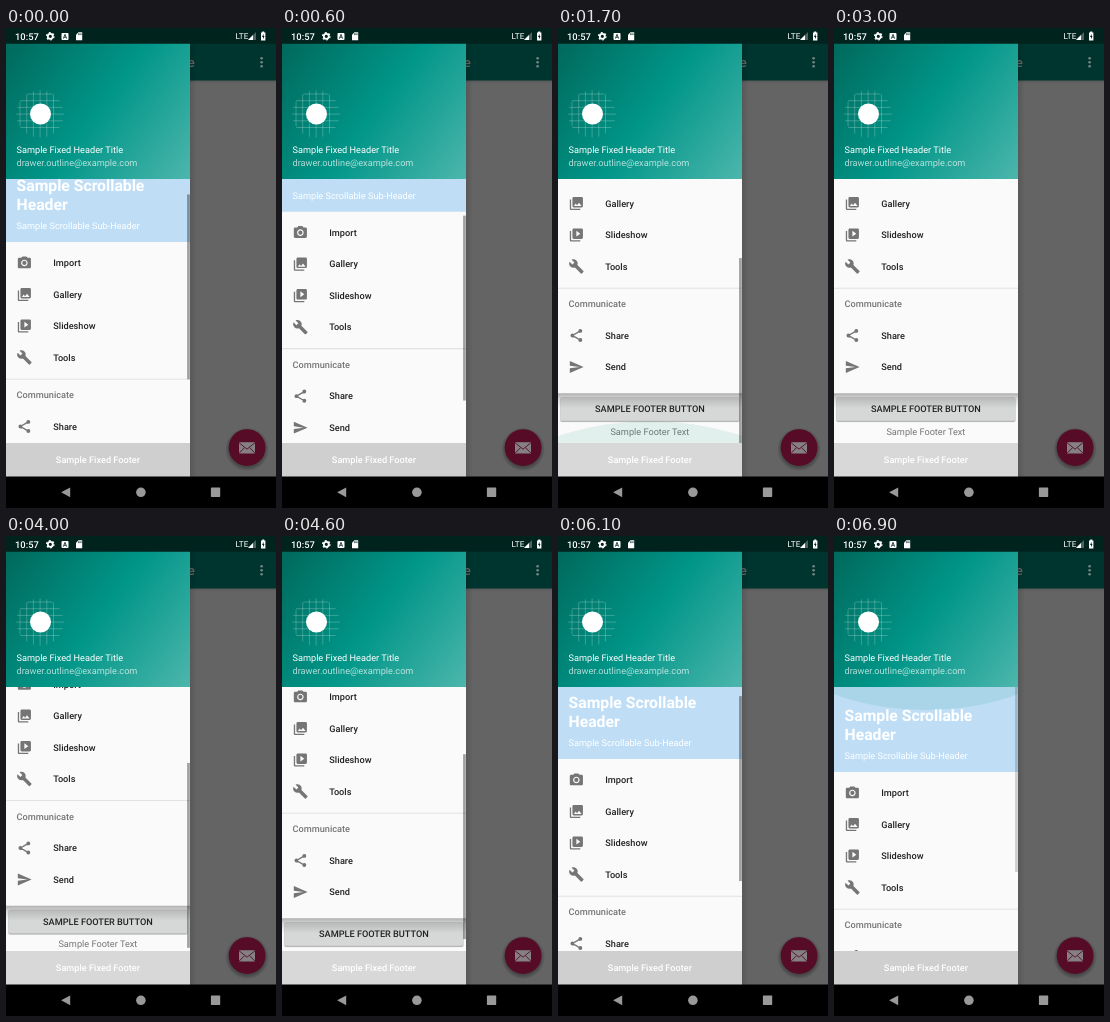
These frames come from a looping animation (270x480 px, 7.1 s). An HTML page:

```html
<!DOCTYPE html>
<html lang="en">
<head>
<meta charset="utf-8">
<title>Navigation drawer</title>
<style>
html, body { margin: 0; width: 100%; height: 100%; overflow: hidden; background: #000; }
svg { display: block; width: 270px; height: 480px; }
text { font: 9.19px Roboto, sans-serif; text-rendering: geometricPrecision; }
.mid { text-anchor: middle; }
.med { font-weight: 500; }
.big { font-size: 15.75px; font-weight: 700; }
.icon { fill: #757575; }
</style>
</head>
<body>
<svg viewBox="0 0 270 480">
  <defs>
    <linearGradient id="teal" gradientUnits="userSpaceOnUse" x1="184" y1="151" x2="0" y2="16">
      <stop stop-color="#4db6ac"/><stop offset=".5" stop-color="#009688"/><stop offset="1" stop-color="#00695c"/>
    </linearGradient>
    <linearGradient id="fade" x2="0" y2="1">
      <stop stop-opacity=".3"/><stop offset=".35" stop-opacity=".13"/><stop offset="1" stop-opacity="0"/>
    </linearGradient>
    <linearGradient id="side">
      <stop stop-opacity=".12"/><stop offset="1" stop-opacity="0"/>
    </linearGradient>
    <radialGradient id="halo">
      <stop offset=".8" stop-opacity=".3"/><stop offset="1" stop-opacity="0"/>
    </radialGradient>
    <clipPath id="view"><path d="M0 151H184V415H0z"/></clipPath>
    <clipPath id="round"><circle cx="34" cy="86" r="23.8"/></clipPath>
  </defs>

  <!-- dimmed page -->
  <path fill="#646464" d="M0 0H270V449H0z"/>
  <path fill="url(#fade)" opacity=".6" d="M0 52.5H270V55.5H0z"/>
  <path fill="#00352f" d="M0 15H270V52.5H0z"/>
  <text class="med" x="181.7" y="38.7" fill="#666" style="font-size:13.1px">e</text>
  <g fill="#7a8583"><circle cx="255.6" cy="30.2" r="1.3"/><circle cx="255.6" cy="34.2" r="1.3"/><circle cx="255.6" cy="38.2" r="1.3"/></g>
  <circle cx="241.1" cy="421.3" r="22" fill="url(#halo)"/>
  <circle cx="241.1" cy="419.6" r="18.4" fill="#560b26"/>
  <path fill="#858083" d="M233 414.2h16v11.3h-16z"/>
  <path fill="none" stroke="#560b26" stroke-width=".9" d="M233 414.7l8 6.5 8-6.5M233 425.2l5.6-5.6M249 425.2l-5.6-5.6"/>
  <path fill="url(#side)" d="M184 15H191V449H184z"/>

  <!-- drawer -->
  <path fill="#fafafa" d="M0 16H184V449H0z"/>
  <g clip-path="url(#view)">
    <g id="content">
      <path fill="#bfdef6" d="M0 151H184V236H0z"/>
      <g fill="#fff">
        <text class="big" x="10.5" y="185.3">Sample Scrollable</text>
        <text class="big" x="10.5" y="203.7">Header</text>
        <text x="10.5" y="222.9">Sample Scrollable Sub-Header</text>
      </g>
      <g id="menu"></g>
      <path fill="#dadada" d="M0 372.7H184v.9H0z"/>
      <text class="med" x="10.5" y="392.3" fill="#757575">Communicate</text>
      <rect x="1.9" y="482" width="180" height="25.2" rx="2" fill="#000" fill-opacity=".1"/>
      <rect x="2.6" y="483.1" width="178.6" height="23.8" rx="1.3" fill="#b5b6b6"/>
      <rect x="2.6" y="482.2" width="178.6" height="23.6" rx="1.3" fill="#d6d7d7"/>
      <path fill="url(#fade)" d="M0 478.3H184v15H0z"/>
      <text class="med mid" x="91.9" y="497" fill="#212121">SAMPLE FOOTER BUTTON</text>
      <text class="mid" x="91.9" y="519.6" fill="#757575">Sample Footer Text</text>
    </g>
    <ellipse id="topGlow" cx="92" cy="151" fill="#008577"/>
    <ellipse id="endGlow" cx="92" cy="415" fill="#008577"/>
    <rect id="bar" x="181.1" width="2.7" height="184.9"/>
  </g>

  <path fill="url(#teal)" d="M0 15H184V151H0z"/>
  <path id="grid" clip-path="url(#round)" fill="none" stroke="#fff" stroke-opacity=".45" stroke-width=".5"/>
  <circle cx="34.5" cy="86" r="10.5" fill="#fff"/>
  <text x="10.5" y="125" fill="#fff">Sample Fixed Header Title</text>
  <text x="10.5" y="137.6" fill="#fff" fill-opacity=".7">drawer.outline@example.com</text>

  <path fill="#d8d8d8" d="M0 415H184V449H0z"/>
  <path id="shade" fill="#cfcfcf" d="M0 415H184V449H0z"/>
  <text class="med mid" x="91.9" y="435" fill="#fff">Sample Fixed Footer</text>

  <!-- system bars -->
  <path fill="#00231e" d="M0 0H270V15.75H0z"/>
  <g fill="#fff">
    <text class="med" x="9" y="11.8" style="font-size:9.4px">10:57</text>
    <circle cx="44.3" cy="8.3" r="2.5" fill="none" stroke="#fff" stroke-width="1.8"/>
    <circle cx="44.3" cy="8.3" r="3.7" fill="none" stroke="#fff" stroke-width="1.2" stroke-dasharray="1.9 1.975"/>
    <rect x="55.5" y="5" width="7" height="7" rx="1"/>
    <path fill="none" stroke="#00231e" stroke-width=".8" d="M57.3 10.7L59 6.3l1.7 4.4M57.9 9.3h2.2"/>
    <path d="M72.5 4.3H76.2V12.3H70V6.8z"/>
    <path stroke="#00231e" stroke-width=".7" d="M72.6 5.3v1.8M73.9 5.3v1.8M75.1 5.3v1.8"/>
    <text x="229.5" y="11.4" style="font-size:8.2px">LTE</text>
    <path d="M250 4V12H242z" fill-opacity=".3"/>
    <path d="M247 7V12H242z"/>
    <path d="M255 4.6h1.2v-1h2v1h1.2v7.8H255z"/>
    <path fill="#00231e" d="M257.6 5.8L256 8.9h1v2.3l1.5-3.2h-.9z"/>
  </g>
  <path d="M0 448.5H270V480H0z"/>
  <g fill="#999">
    <path d="M55.1 464.3L64.2 459.4V469.2z"/><circle cx="134.9" cy="464.3" r="4.8"/>
    <rect x="204.9" y="459.6" width="9.3" height="9.3" rx=".6"/>
  </g>
</svg>
<script>
const $ = id => document.getElementById(id);

const rows = [
  ['Import', 257, 'M9 2L7.17 4H4c-1.1 0-2 .9-2 2v12c0 1.1.9 2 2 2h16c1.1 0 2-.9 2-2V6c0-1.1-.9-2-2-2h-3.17L15 2H9zm3 15c-2.76 0-5-2.24-5-5s2.24-5 5-5 5 2.24 5 5-2.24 5-5 5zM8.8 12a3.2 3.2 0 1 0 6.4 0a3.2 3.2 0 1 0-6.4 0z'],
  ['Gallery', 288.5, 'M22 16V4c0-1.1-.9-2-2-2H8c-1.1 0-2 .9-2 2v12c0 1.1.9 2 2 2h12c1.1 0 2-.9 2-2zm-11-4l2.03 2.71L16 11l4 5H8l3-4zM2 6v14c0 1.1.9 2 2 2h14v-2H4V6H2z'],
  ['Slideshow', 320, 'M4 6H2v14c0 1.1.9 2 2 2h14v-2H4V6zm16-4H8c-1.1 0-2 .9-2 2v12c0 1.1.9 2 2 2h12c1.1 0 2-.9 2-2V4c0-1.1-.9-2-2-2zm-8 12.5v-9l6 4.5-6 4.5z'],
  ['Tools', 351.5, 'M22.7 19l-9.1-9.1c.9-2.3.4-5-1.5-6.9-2-2-5-2.4-7.4-1.3L9 6 6 9 1.6 4.7C.4 7.1.9 10.1 2.9 12.1c1.9 1.9 4.6 2.4 6.9 1.5l9.1 9.1c.4.4 1 .4 1.4 0l2.3-2.3c.5-.4.5-1.1.1-1.4z'],
  ['Share', 420.5, 'M15 5a3 3 0 1 0 6 0a3 3 0 1 0-6 0zM3 12a3 3 0 1 0 6 0a3 3 0 1 0-6 0zM15 19a3 3 0 1 0 6 0a3 3 0 1 0-6 0zM17.5 4.1L5.5 11.1V12.9L17.5 19.9L18.5 18.1L8 12L18.5 5.9z'],
  ['Send', 452, 'M2.01 21L23 12 2.01 3 2 10l15 2-15 2z']
];
$('menu').innerHTML = rows.map(([name, y, d]) => `
  <path class="icon" fill-rule="${name == 'Share' ? 'nonzero' : 'evenodd'}" transform="translate(10.5 ${y - 7.9}) scale(.656)" d="${d}"/>
  <text class="med" x="47.25" y="${y + 3.1}" fill="#212121">${name}</text>`).join('');

let grid = '';
for (let k = -20; k <= 20; k += 6.7) grid += `M${34 + k} 62v48M10 ${86 + k}h48`;
$('grid').setAttribute('d', grid);

// [time, value] tracks, linear between points
const scroll = [[0, 22], [100, 23], [200, 23], [1100, 89], [1500, 113], [3800, 113], [4200, 104], [4300, 104],
  [4600, 96], [4700, 93], [4800, 93], [5500, 32], [5600, 27], [5700, 26], [5800, 26], [6400, 0]];
const topPull = [[6300, 0], [6600, .7], [6700, .75], [6800, .75], [6900, .78]];
const endPull = [[1500, 0], [1700, .74], [1800, .78], [2100, .4], [2200, .4], [2300, .2], [2400, .2], [2500, 0],
  [2600, 0], [2700, .6], [2800, .75], [2900, .4], [3000, 0]];
const barFade = [[1800, 1], [2100, .5], [2200, .5], [2300, .25], [2400, .25], [2500, 0], [3800, 0], [3900, 1],
  [6600, 1], [6700, .8], [6800, .8], [6900, .5]];

function at(track, t) {
  const i = track.findIndex(p => p[0] > t);
  if (i < 0) return track[track.length - 1][1];
  if (i == 0) return track[0][1];
  const [t0, a] = track[i - 1], [t1, b] = track[i];
  return a + (b - a) * (t - t0) / (t1 - t0);
}

// A circle segment wider than the drawer, squashed by the pull
function glow(id, edge, dir, pull) {
  const r = 220.5, cut = r * Math.cos(Math.PI / 6), el = $(id);
  el.setAttribute('rx', r);
  el.setAttribute('ry', r * pull);
  el.setAttribute('cy', edge - dir * cut * pull);
  el.setAttribute('opacity', .14 * pull);
}

function draw(now) {
  const t = Math.floor(now % 7100 / 100) * 100;
  const y = at(scroll, t);
  $('content').setAttribute('transform', `translate(0 ${-y})`);
  $('bar').setAttribute('y', 151 + y * .7);
  $('bar').setAttribute('opacity', .36 * at(barFade, t));
  $('shade').setAttribute('opacity', Math.min(1, Math.max(0, (84 - y) / 20)));
  glow('topGlow', 151, 1, at(topPull, t));
  glow('endGlow', 415, -1, at(endPull, t));
}

const start = performance.now();
function tick() {
  draw(performance.now() - start);
  requestAnimationFrame(tick);
}
tick();
</script>
</body>
</html>
```
